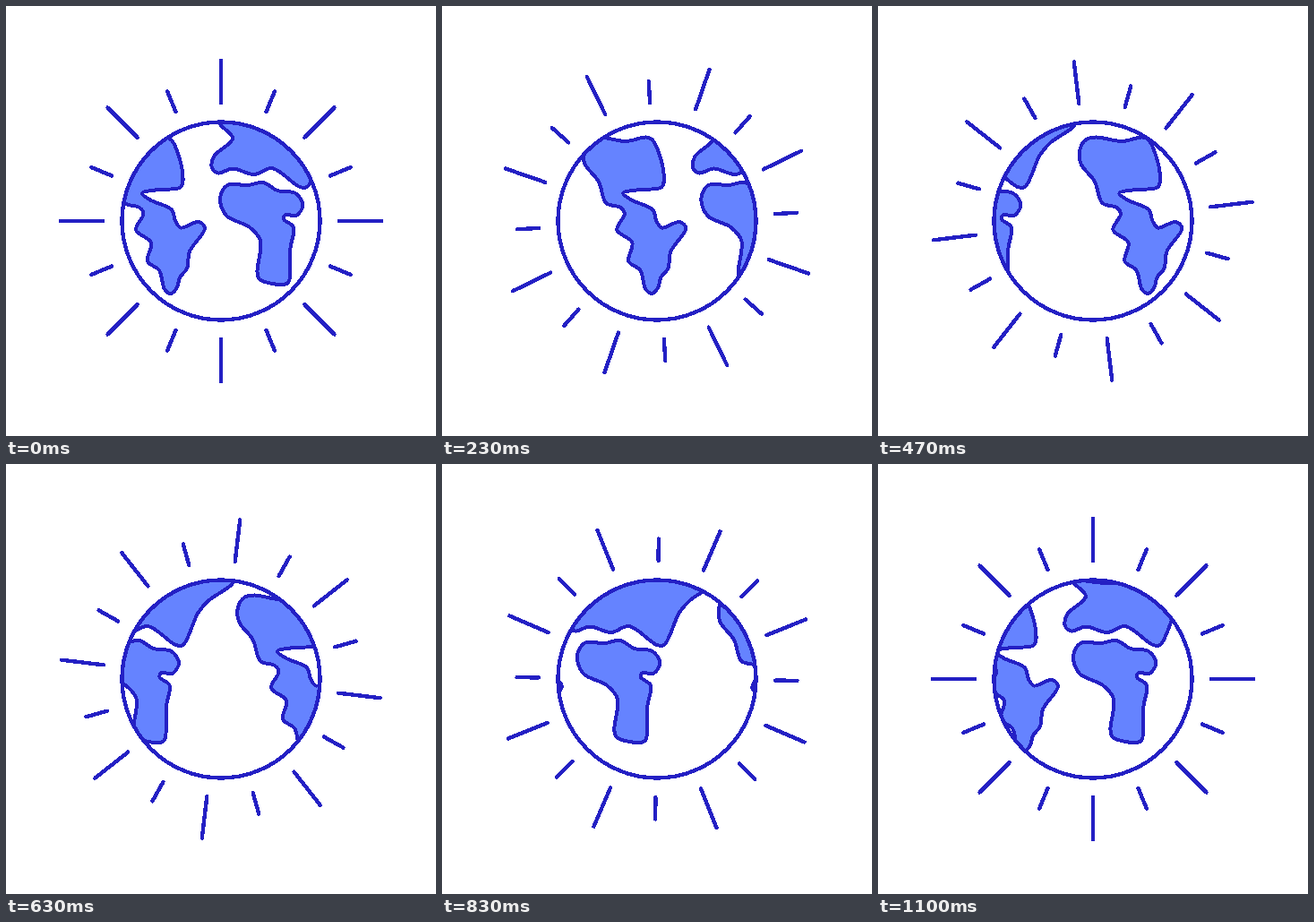
Animation of 480x480 px, one loop 1.13 s. Source, as an HTML page:

```html
<!DOCTYPE html>
<html lang="en">
<head>
<meta charset="utf-8">
<title>Spinning globe</title>
<style>
  html, body { margin: 0; width: 100%; height: 100%; overflow: hidden; background: #fff; }
  svg { display: block; width: 100%; height: 100%; shape-rendering: crispEdges; }
  #rays, #map, .rim { stroke: #2420c4; stroke-width: 4.4; stroke-linecap: round; stroke-linejoin: round; }
  #map { fill: #6583ff; stroke-width: 4; }
  .rim { fill: none; }
</style>
</head>
<body>
<svg viewBox="0 0 480 480">
  <defs>
    <clipPath id="disc"><circle cx="240" cy="240" r="111"/></clipPath>
  </defs>
  <g id="rays"></g>
  <g clip-path="url(#disc)"><g id="map"></g></g>
  <circle class="rim" cx="240" cy="240" r="110.5"/>
</svg>
<script>
const LOOP = 1130;
const PERIOD = 289.5;      // width of one turn of the map
const MAP_STEP = 16.78;    // the map moves on every second frame
const RAY_STEP = 90 / 33;  // the rays turn on every frame

// Key points of each coast, joined by smooth curves
const america = [
  [126, 146.5], [155, 151], [178, 146.5], [185, 150], [197, 185], [195, 202],
  [170, 205], [152, 209], [161, 216.5], [185, 227.5], [189, 240], [195, 247.5],
  [215, 241], [222, 248], [205, 274], [202, 293], [194, 303], [191, 314],
  [184, 321], [177, 316], [171, 295], [158, 285], [162, 264], [145, 250],
  [153.5, 232], [149, 225], [133, 220], [124.5, 196], [109, 176], [108, 160],
  [115, 149]
];
const eurasia = [
  [239, 131], [253, 147.5], [232, 168], [230, 181], [237, 186.5], [253, 181.5],
  [277, 188], [297, 181], [328, 202], [336, 202], [353, 166], [364, 153],
  [392, 131], [340, 120], [283, 133]
];
const africa = [
  [239, 215], [247, 200], [270, 200], [287, 197], [303, 206], [323, 209],
  [331.5, 222], [324, 234], [312, 233], [310, 238], [321, 247], [317.5, 270],
  [315.5, 308], [310, 311], [283, 305], [280.5, 297], [284, 262], [272, 247],
  [246, 234]
];

function add(parent, tag, attrs) {
  const el = document.createElementNS("http://www.w3.org/2000/svg", tag);
  for (const key in attrs) el.setAttribute(key, attrs[key]);
  return parent.appendChild(el);
}

// Bézier handle at p towards q, coming from a (centripetal Catmull-Rom)
function handle(a, p, q) {
  const m = Math.hypot(p[0] - a[0], p[1] - a[1]);
  const n = Math.hypot(q[0] - p[0], q[1] - p[1]);
  const mn = Math.sqrt(m * n);
  return p.map((v, k) =>
    (m * q[k] - n * a[k] + (2 * m + 3 * mn + n) * v) / (3 * (m + mn)));
}

function smooth(pts) {
  const at = i => pts[(i + pts.length) % pts.length];
  const parts = pts.map((p, i) => {
    const q = at(i + 1);
    return "C" + [handle(at(i - 1), p, q), handle(at(i + 2), q, p), q].join(" ");
  });
  return "M" + pts[0] + parts.join("") + "Z";
}

const map = document.getElementById("map");
const rays = document.getElementById("rays");

for (const shift of [-PERIOD, 0]) {
  const copy = add(map, "g", { transform: `translate(${shift})` });
  for (const land of [america, eurasia, africa]) add(copy, "path", { d: smooth(land) });
}
for (let i = 0; i < 16; i++) {
  add(rays, "line", {
    x1: 240, x2: 240, y1: 108, y2: i % 2 ? 83.5 : 61,
    transform: `rotate(${i * 22.5} 240 240)`
  });
}

function draw(ms) {
  // 30 frames a second, each start rounded to 10 ms
  const frame = Math.floor((Math.floor(ms / 10) * 6 + 3) / 20);
  rays.setAttribute("transform", `rotate(${frame * RAY_STEP} 240 240)`);
  map.setAttribute("transform", `translate(${Math.floor(frame / 2) * MAP_STEP})`);
}

const start = performance.now();
function tick() {
  draw((performance.now() - start) % LOOP);
  requestAnimationFrame(tick);
}
draw(0);
requestAnimationFrame(tick);
</script>
</body>
</html>
```
